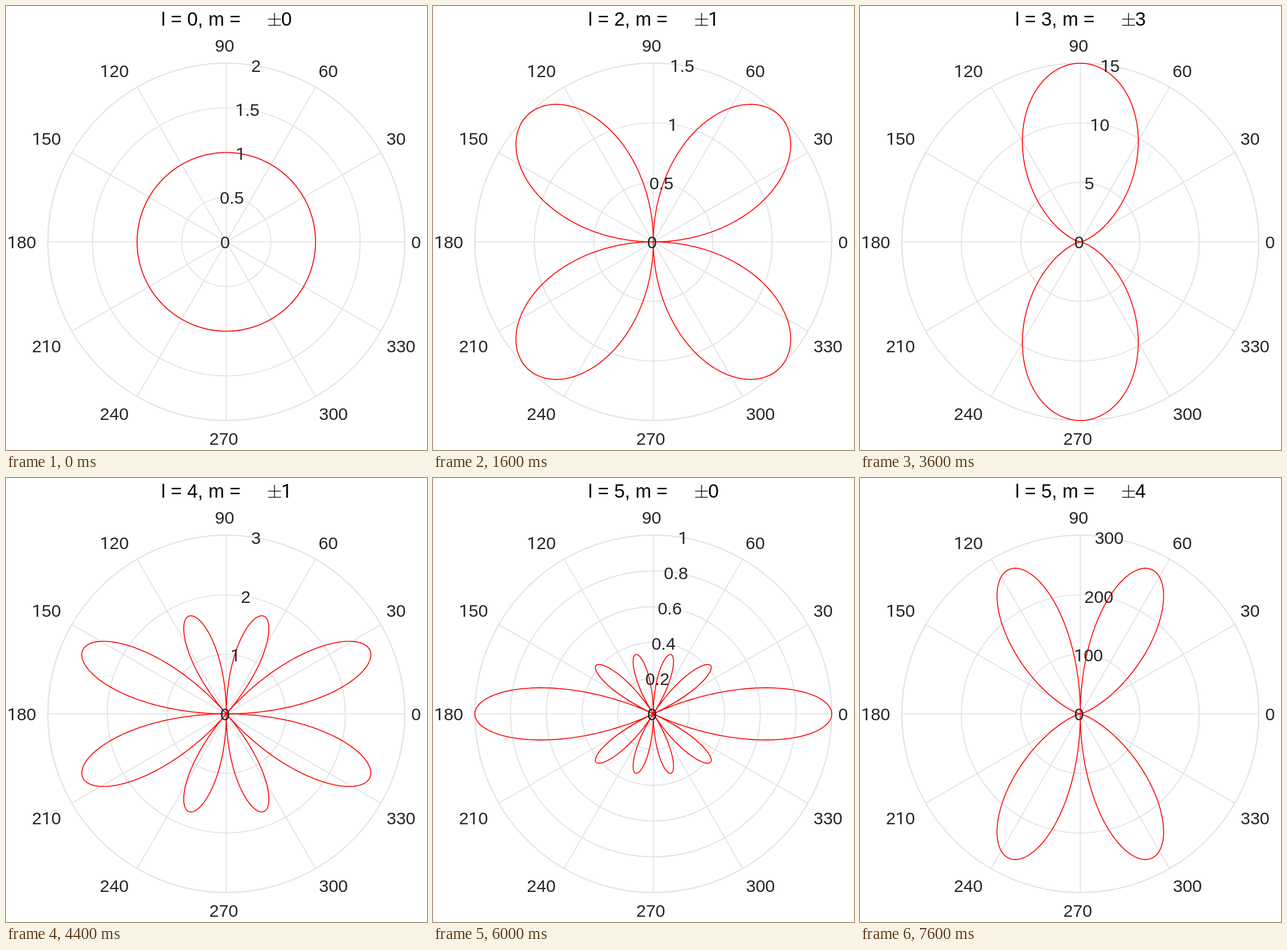
Recreate the animation shown at these times as an HTML page. Size 729 by 768 pixels, loop 8 s.

```html
<!DOCTYPE html>
<html lang="en">
<head>
<meta charset="utf-8">
<title>Polar plots of associated Legendre functions</title>
<style>
  html, body { margin: 0; width: 100%; height: 100%; overflow: hidden; background: #fff; }
  svg { display: block; width: 729px; height: 768px; }
  text { font: 30px "Liberation Sans", Arial, sans-serif; fill: #262626; white-space: pre; }
  .one { font-family: Roboto, "Liberation Sans", sans-serif; }
  .mid { text-anchor: middle; }
  .title { font-size: 33px; fill: #000; }
  .grid { fill: none; stroke: #e1e1e1; stroke-width: 1.7; }
  .curve { fill: none; stroke: #f00; stroke-width: 1.6; stroke-linejoin: round; }
  .sign { fill: none; stroke: #000; stroke-width: 1.35; }
</style>
</head>
<body>
<svg viewBox="0 0 729 768"></svg>
<script>
const CX = 381.5, CY = 408, R = 309, STEP_MS = 400, RAD = Math.PI / 180;

// Outer radius value for each (l, m), in order of l, then m
const LIMITS = [2, 1, 1, 1, 1.5, 3, 1, 2.5, 6, 15, 1, 3, 10, 35, 120, 1, 3.5, 15, 70, 300];

const ANGLE_LABELS = [
  [710, 408], [675.5, 229], [558, 112], [378.5, 68], [187.5, 112], [70, 229],
  [27, 408], [70, 588], [187.5, 705], [377, 748], [567, 705], [684, 588]
];

const svg = document.querySelector('svg');

function add(parent, tag, attrs) {
  const el = document.createElementNS('http://www.w3.org/2000/svg', tag);
  for (const key in attrs) el.setAttribute(key, attrs[key]);
  return parent.appendChild(el);
}

// The digit 1 is set in a face without a foot
function label(parent, x, y, str, cls) {
  const el = add(parent, 'text', { x, y, class: cls });
  for (const part of str.split(/(1)/)) {
    if (part) add(el, 'tspan', part === '1' ? { class: 'one' } : {}).textContent = part;
  }
}

const polar = (r, a) => [CX + r * Math.cos(a), CY - r * Math.sin(a)];

function legendre(l, m, a) {
  const c = Math.cos(a), s = Math.abs(Math.sin(a));
  let prev = 0, cur = 1;
  for (let k = 1; k <= m; k++) cur *= (2 * k - 1) * s;
  for (let k = m + 1; k <= l; k++) {
    [prev, cur] = [cur, ((2 * k - 1) * c * cur - (k + m - 1) * prev) / (k - m)];
  }
  return cur;
}

// Smallest 1-2-5 step giving at most five rings
function ringStep(limit) {
  for (let p = 0.1; ; p *= 10) {
    for (const k of [1, 2, 5]) if (limit / (k * p) <= 5.001) return k * p;
  }
}

function curvePath(l, m, limit) {
  const points = [];
  for (let i = 0; i < 1440; i++) {
    const a = i * RAD / 4;
    const r = Math.abs(legendre(l, m, a)) / limit * R;
    points.push(polar(r, a).map(v => v.toFixed(2)).join(' '));
  }
  return 'M' + points.join('L') + 'Z';
}

function buildPlot(l, m, limit) {
  const g = add(svg, 'g', { visibility: 'hidden' });
  const step = ringStep(limit), count = Math.floor(limit / step + 0.001);
  for (let i = 1; i <= count; i++) {
    add(g, 'circle', { class: 'grid', cx: CX, cy: CY, r: i * step / limit * R });
  }
  add(g, 'path', { class: 'curve', d: curvePath(l, m, limit) });
  for (let i = 0; i <= count; i++) {
    const str = String(+(i * step).toFixed(1));
    const [x, y] = polar(i * step / limit * R, 80 * RAD);
    label(g, x - (str.length > 2 ? 3.7 : 2.2), y + 10.5, str, 'mid');
  }
  label(g, 268.8, 34, `l = ${l}, m =`, 'title');
  label(g, 476.6, 34, String(m), 'title');
  return g;
}

for (let i = 0; i < 12; i++) {
  const [x, y] = polar(R, i * 30 * RAD);
  add(svg, 'path', { class: 'grid', d: `M${CX} ${CY}L${x} ${y}` });
}
add(svg, 'circle', { class: 'grid', cx: CX, cy: CY, r: R });
ANGLE_LABELS.forEach(([x, y], i) => label(svg, x, y + 10.5, String(i * 30), 'mid'));
add(svg, 'path', { class: 'sign', d: 'M454 22.6H476M465 12V33.3M454 33.3H476' });

const plots = [];
for (let l = 0; l <= 5; l++) {
  for (let m = 0; m <= l && plots.length < LIMITS.length; m++) {
    plots.push(buildPlot(l, m, LIMITS[plots.length]));
  }
}

let shown = -1;
const start = performance.now();

function draw(now) {
  const index = Math.floor(Math.max(0, now - start) / STEP_MS) % plots.length;
  if (index !== shown) {
    if (shown >= 0) plots[shown].setAttribute('visibility', 'hidden');
    plots[index].setAttribute('visibility', 'visible');
    shown = index;
  }
  requestAnimationFrame(draw);
}
draw(start);
</script>
</body>
</html>
```
